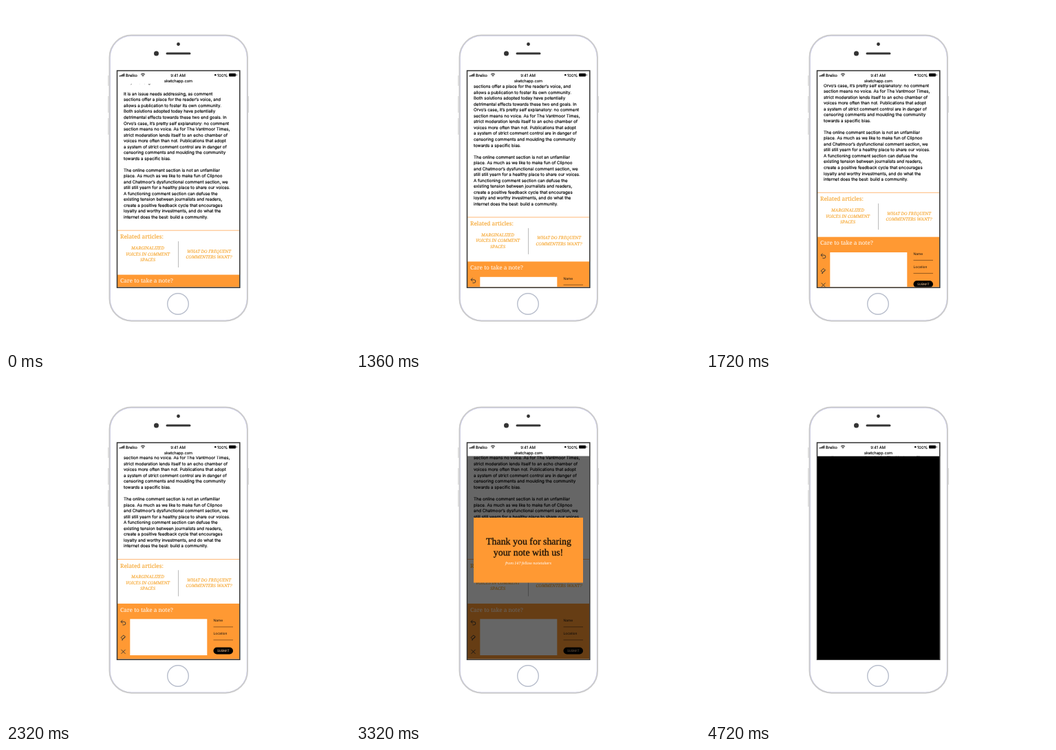
Recreate the animation shown at these times as an HTML page. Size 500 by 500 pixels, loop 4.76 s.

```html
<!DOCTYPE html>
<html lang="en">
<head>
<meta charset="utf-8">
<title>Note form on a phone</title>
<style>
  html, body { margin: 0; width: 100%; height: 100%; overflow: hidden; background: #fff; }
  svg, #fade { position: absolute; left: 0; top: 0; }
  text { font-family: Inter, sans-serif; text-rendering: geometricPrecision; white-space: pre; }
  .mid { text-anchor: middle; }
  .status text { font-size: 5.7px; fill: #000; stroke: #000; stroke-width: .12; }
  .body text { font-size: 6.2px; fill: #000; stroke: #000; stroke-width: .15; }
  .form text { font-size: 4.9px; fill: #111; }
  .form .head, .head { font: 8.25px "Noto Serif", serif; fill: #fff; }
  .gold { fill: #f5a32a; stroke: #f5a32a; stroke-width: .12; }
  .link { font: italic 6.15px "Noto Serif", serif; text-anchor: middle; }
  .icon { fill: none; stroke: #333; stroke-width: .9; }
  #popup { left: 171px; top: 203px; }
  #popup text { text-anchor: middle; font: 13.9px "Liberation Serif", serif; fill: #1a1208; stroke: #1a1208; stroke-width: .3; }
  #popup .sub { font: italic 5.4px "Noto Serif", serif; fill: #fff; stroke: none; }
  #fade { left: 162px; top: 113.5px; width: 177px; height: 295px; background: #000; }
</style>
</head>
<body>
<svg width="500" height="500" viewBox="0 0 500 500">
  <defs><clipPath id="view"><rect x="162" y="113.5" width="177" height="295"/></clipPath></defs>

  <!-- phone -->
  <path d="M148.800 101v15M148.800 131v24M148.800 163v24M352.200 131v24" stroke="#ccc"/>
  <rect x="151.3" y="43.3" width="199" height="413.800" rx="31.500" fill="#fff" stroke="#ccf"/>
  <rect x="150.500" y="42.500" width="200.500" height="415.200" rx="32" fill="none" stroke="#ccc" stroke-width="2"/>
  <g fill="#333">
    <circle cx="250.500" cy="55.500" r="2.400"/>
    <circle cx="218.500" cy="69" r="3.500"/>
    <rect x="232.500" y="67.500" width="36" height="3" rx="1.500"/>
  </g>
  <circle cx="250" cy="433" r="15.300" fill="none" stroke="#b8becc" stroke-width="1.400"/>

  <!-- scrolling page -->
  <g clip-path="url(#view)">
    <g id="page">
      <g class="body" id="article"></g>
      <path d="M162 326.200H340" stroke="#ffb877"/>
      <text class="head gold" x="166" y="338.300">Related articles:</text>
      <g class="gold">
        <text class="link" x="206" y="354">MARGINALIZED</text>
        <text class="link" x="206" y="362.500">VOICES IN COMMENT</text>
        <text class="link" x="206" y="371">SPACES</text>
        <text class="link" x="295" y="358.600">WHAT DO FREQUENT</text>
        <text class="link" x="295" y="367.100">COMMENTERS WANT?</text>
      </g>
      <path d="M250.500 342V380" stroke="#bbb"/>
      <g class="form">
        <rect x="161" y="390.600" width="180" height="90" fill="#f93"/>
        <text class="head" x="166" y="402.400">Care to take a note?</text>
        <rect x="180.300" y="413" width="112" height="52.700" fill="#fff"/>
        <path class="icon" d="M169.500 414.500l-2.500 2.500 2.500 2.500M167 417h4.500a2.300 2.300 0 0 1 0 4.600h-2"/>
        <path class="icon" d="M167 440l4-3.500 2.500 2.500-4 3.500zM169 442.500l4-3.500M168 443.500h2"/>
        <path class="icon" d="M167.500 457.500l6 6M173.500 457.500l-6 6"/>
        <text x="301.500" y="417.200">Name</text>
        <text x="301.500" y="436.200">Location</text>
        <path d="M301.500 424.500h28.500M301.500 443.500h28.500" stroke="#7a4a1a" stroke-width=".8"/>
        <rect x="301.500" y="454.200" width="28.500" height="10" rx="5"/>
        <text class="mid" x="315.800" y="460.900" style="font-size:4.600px;fill:#fc9">SUBMIT</text>
      </g>
    </g>
    <rect id="shade" x="161" y="113" width="180" height="297"/>
  </g>

  <!-- status bar -->
  <g class="status">
    <path d="M165.500 102.500v-1.500M167.500 102.500v-2.300M169.500 102.500v-3.200M171.500 102.500v-4.300" stroke="#111" stroke-width="1.400"/>
    <text x="174" y="102.500">Brelko</text>
    <path d="M196 99.400q3-2.600 6 0M197.300 100.900q1.700-1.400 3.400 0" fill="none" stroke="#111"/>
    <circle cx="199" cy="102.100" r=".7"/>
    <text class="mid" x="250" y="102.500">9:41 AM</text>
    <text class="mid" x="250.500" y="110.500">sketchapp.com</text>
    <circle cx="304.300" cy="100.300" r="1.300"/>
    <text x="307" y="102.500">100%</text>
    <rect x="324" y="98" width="10" height="4.500" rx="1"/>
    <path d="M335.200 99.400v1.800" stroke="#111"/>
  </g>
  <rect x="161.500" y="94" width="178.300" height="315.300" fill="none" stroke="#333" stroke-width="1.500"/>
</svg>

<svg id="popup" width="159" height="94.500" viewBox="0 0 159 94.500">
  <rect width="159" height="94.500" fill="#f93"/>
  <text x="80" y="38.500">Thank you for sharing</text>
  <text x="79.500" y="55.300">your note with us!</text>
  <text class="sub" x="79.500" y="67.700">from 147 fellow notetakers</text>
</svg>
<div id="fade"></div>

<script>
const LOOP = 4760, SCROLL = 62.7, LINE = 8.53;
const get = id => document.getElementById(id);
const [article, page, shade, popup, fade] = ['article', 'page', 'shade', 'popup', 'fade'].map(get);

const lines = `Why it is long

It is an issue needs addressing, as comment
sections offer a place for the reader’s voice, and
allows a publication to foster its own community.
Both solutions adopted today have potentially
detrimental effects towards these two end goals. In
Orvo’s case, it’s pretty self explanatory: no comment
section means no voice. As for The Vantmoor Times,
strict moderation lends itself to an echo chamber of
voices more often than not. Publications that adopt
a system of strict comment control are in danger of
censoring comments and moulding the community
towards a specific bias.

The online comment section is not an unfamiliar
place. As much as we like to make fun of Clipnoo
and Chatmoor’s dysfunctional comment section, we
still still yearn for a healthy place to share our voices.
A functioning comment section can defuse the
existing tension between journalists and readers,
create a positive feedback cycle that encourages
loyalty and worthy investments, and do what the
internet does the best: build a community.`.split('\n');

article.innerHTML = lines.map((line, i) =>
  `<text x="171" y="${112.8 + i * LINE}">${line}</text>`).join('');

const progress = (t, start, length) => Math.min(1, Math.max(0, (t - start) / length));
const ease = u => u < .5 ? 2 * u * u : 1 - 2 * (1 - u) ** 2;

function draw() {
  const t = performance.now() % LOOP;
  const scroll = ease(progress(t, 970, 1000));
  const open = ease(progress(t, 2840, 450));

  page.setAttribute('transform', `translate(0 ${-SCROLL * scroll})`);
  shade.setAttribute('opacity', .6 * open);
  popup.style.opacity = open;
  popup.style.transform =
    `scale(${open ** 1.5}) perspective(400px) rotateX(${55 * (1 - open)}deg)`;
  fade.style.opacity = progress(t, 4480, 240);
  requestAnimationFrame(draw);
}
draw();
</script>
</body>
</html>
```
